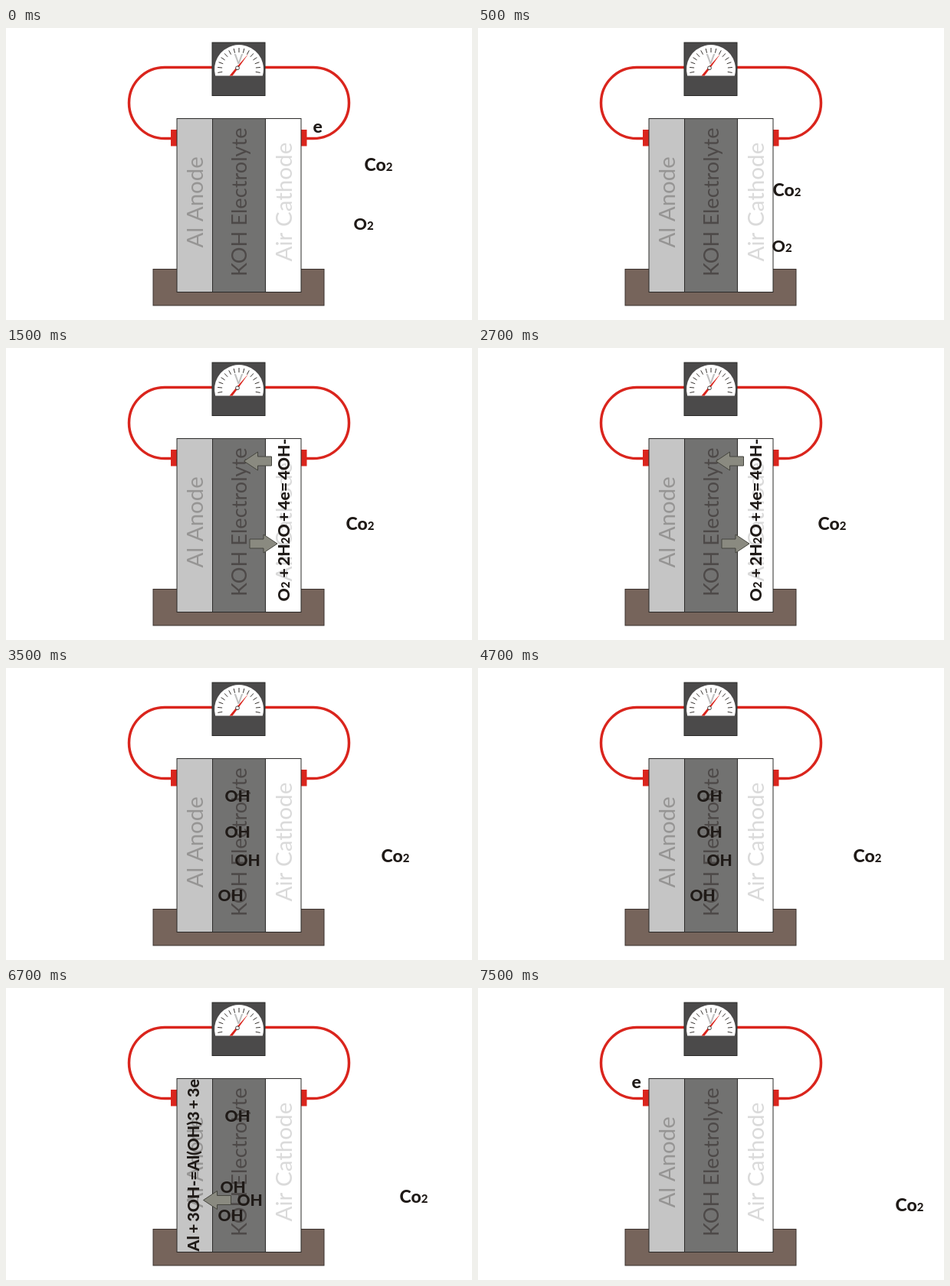
An HTML page with a canvas that plays this animation: 608 by 382 pixels, repeating every 8 s.

```html
<!DOCTYPE html>
<html lang="en">
<head>
<meta charset="utf-8">
<title>Aluminium-air cell</title>
<style>
html, body { margin: 0; width: 100%; height: 100%; overflow: hidden; background: #fff; }
canvas { display: block; width: 608px; height: 382px; }
</style>
</head>
<body>
<canvas id="stage" width="608" height="382"></canvas>
<script>
const ctx = document.getElementById('stage').getContext('2d');
const LOOP = 8000;
const INK = '#1f1a17';
const RED = '#da251d';
const FAMILY = 'Lato, "Open Sans", sans-serif';

function box(x, y, w, h, fill, stroke) {
  ctx.fillStyle = fill;
  ctx.fillRect(x, y, w, h);
  if (!stroke) return;
  ctx.strokeStyle = stroke;
  ctx.lineWidth = 1;
  ctx.strokeRect(x, y, w, h);
}

function line(x1, y1, x2, y2, color, width) {
  ctx.strokeStyle = color;
  ctx.lineWidth = width;
  ctx.beginPath();
  ctx.moveTo(x1, y1);
  ctx.lineTo(x2, y2);
  ctx.stroke();
}

function polygon(points, fill, stroke) {
  ctx.beginPath();
  points.forEach(([x, y]) => ctx.lineTo(x, y));
  ctx.closePath();
  ctx.fillStyle = fill;
  ctx.fill();
  if (!stroke) return;
  ctx.strokeStyle = stroke;
  ctx.lineWidth = 1;
  ctx.stroke();
}

// An underscore before a digit makes it small.
function formula(text, x, y, size = 21) {
  ctx.fillStyle = INK;
  ctx.wordSpacing = '-2px';
  for (const part of text.split(/(_\d)/)) {
    const small = part[0] === '_';
    const run = small ? part[1] : part;
    ctx.font = `800 ${small ? 15 : size}px ${FAMILY}`;
    ctx.fillText(run, x, y);
    x += ctx.measureText(run).width;
  }
  ctx.wordSpacing = '0px';
}

function upward(x, y, draw) {
  ctx.save();
  ctx.translate(x, y);
  ctx.rotate(-Math.PI / 2);
  draw();
  ctx.restore();
}

function label(text, x, y, size, color) {
  upward(x, y, () => {
    ctx.font = `${size}px ${FAMILY}`;
    ctx.fillStyle = color;
    ctx.fillText(text, 0, 0);
  });
}

const equation = (text, x, y) => upward(x, y, () => formula(text, 0, 0, 21.3));

function arrow(x, y, dir) {
  const outline = [[0, 0], [18, -12], [18, -6], [36, -6], [36, 6], [18, 6], [18, 12]];
  polygon(outline.map(([dx, dy]) => [x - dir * dx, y + dy]), '#8a8a80', '#45453e');
}

function wire(endX, bendX, plugX, leftward) {
  ctx.strokeStyle = RED;
  ctx.lineWidth = 3.5;
  ctx.beginPath();
  ctx.moveTo(endX, 51.5);
  ctx.lineTo(bendX, 51.5);
  ctx.arc(bendX, 98, 46.5, -Math.PI / 2, Math.PI / 2, leftward);
  ctx.lineTo(plugX, 144.5);
  ctx.stroke();
}

function meter() {
  box(269, 19, 69, 69.5, '#4b4a4a', '#2b2a29');
  const cx = 304, cy = 54, r = 32, dip = Math.asin(8.5 / r);
  ctx.beginPath();
  ctx.arc(cx, cy, r, Math.PI - dip, dip);
  ctx.closePath();
  ctx.fillStyle = '#fff';
  ctx.fill();
  for (let i = 0; i <= 14; i++) {
    const a = Math.PI * (0.95 + i * 1.1 / 14);
    const c = Math.cos(a), s = Math.sin(a);
    line(cx + 22 * c, cy + 22 * s, cx + 28 * c, cy + 28 * s, INK, 0.9);
  }
  ctx.font = `bold 16.5px ${FAMILY}`;
  ctx.fillStyle = '#c0c0c0';
  ctx.fillText('V', 297.8, 47);
  polygon([[316.5, 33.5], [303, 52.5], [295.5, 62.5], [291.5, 62.5], [301, 51]], RED);
  ctx.beginPath();
  ctx.arc(302, 52.3, 2.4, 0, Math.PI * 2);
  ctx.fillStyle = '#fff';
  ctx.fill();
  ctx.strokeStyle = INK;
  ctx.lineWidth = 0.8;
  ctx.stroke();
}

function cell() {
  box(192, 315.5, 223, 47.5, '#76645b', '#3b322e');
  wire(269, 207, 216, true);
  wire(338, 401, 391, false);
  box(215, 133, 8, 21.5, RED);
  box(385, 133, 7.5, 21.5, RED);
  box(223, 118.5, 46.5, 227, '#c5c5c5', '#2b2a29');
  box(338.5, 118.5, 46.5, 227, '#fff', '#2b2a29');
  box(269.5, 118.5, 69, 227, '#727271', '#2b2a29');
  label('Al Anode', 256.5, 287.5, 29.4, '#969594');
  label('KOH Electrolyte', 314, 325, 27.2, '#4d4948');
  label('Air Cathode', 373, 305.5, 29.6, '#dadada');
  meter();
}

const carbon = (x, y) => formula('Co_2', x - 0.5, y, 23);
const oxygen = (x, y) => formula('O_2', x - 0.5, y, 21.5);
const electron = (x, y) => formula('e', x - 0.5, y, 23);
const hydroxides = (...spots) => spots.forEach(([x, y]) => formula('OH', x - 0.5, y));

const scenes = [
  [0, () => { electron(401, 136.5); carbon(468, 187); oxygen(454, 264); }],
  [500, () => { carbon(385, 220); oxygen(384, 293); }],
  [1000, () => { carbon(416, 246); oxygen(352, 304); }],
  [1500, () => {
    arrow(310.5, 148, -1);
    arrow(354, 256, 1);
    equation('O_2 + 2H_2O + 4e= 4OH-', 369.5, 331.5);
    carbon(444, 238);
  }],
  [3500, () => {
    hydroxides([286, 175], [286, 222], [299, 259], [277, 305]);
    carbon(490, 254);
  }],
  [5500, () => {
    equation('Al + 3OH-=Al(OH)3 + 3e', 251.5, 344.5);
    arrow(257.5, 277.5, -1);
    hydroxides([286, 175], [280, 268], [302, 285], [277, 305]);
    carbon(514, 281);
  }],
  [7500, () => { electron(201, 131); carbon(545, 292); }]
];

const start = performance.now();

function render() {
  const t = (performance.now() - start) % LOOP;
  ctx.fillStyle = '#fff';
  ctx.fillRect(0, 0, 608, 382);
  cell();
  scenes.filter(([from]) => from <= t).pop()[1]();
  requestAnimationFrame(render);
}

render();
</script>
</body>
</html>
```
